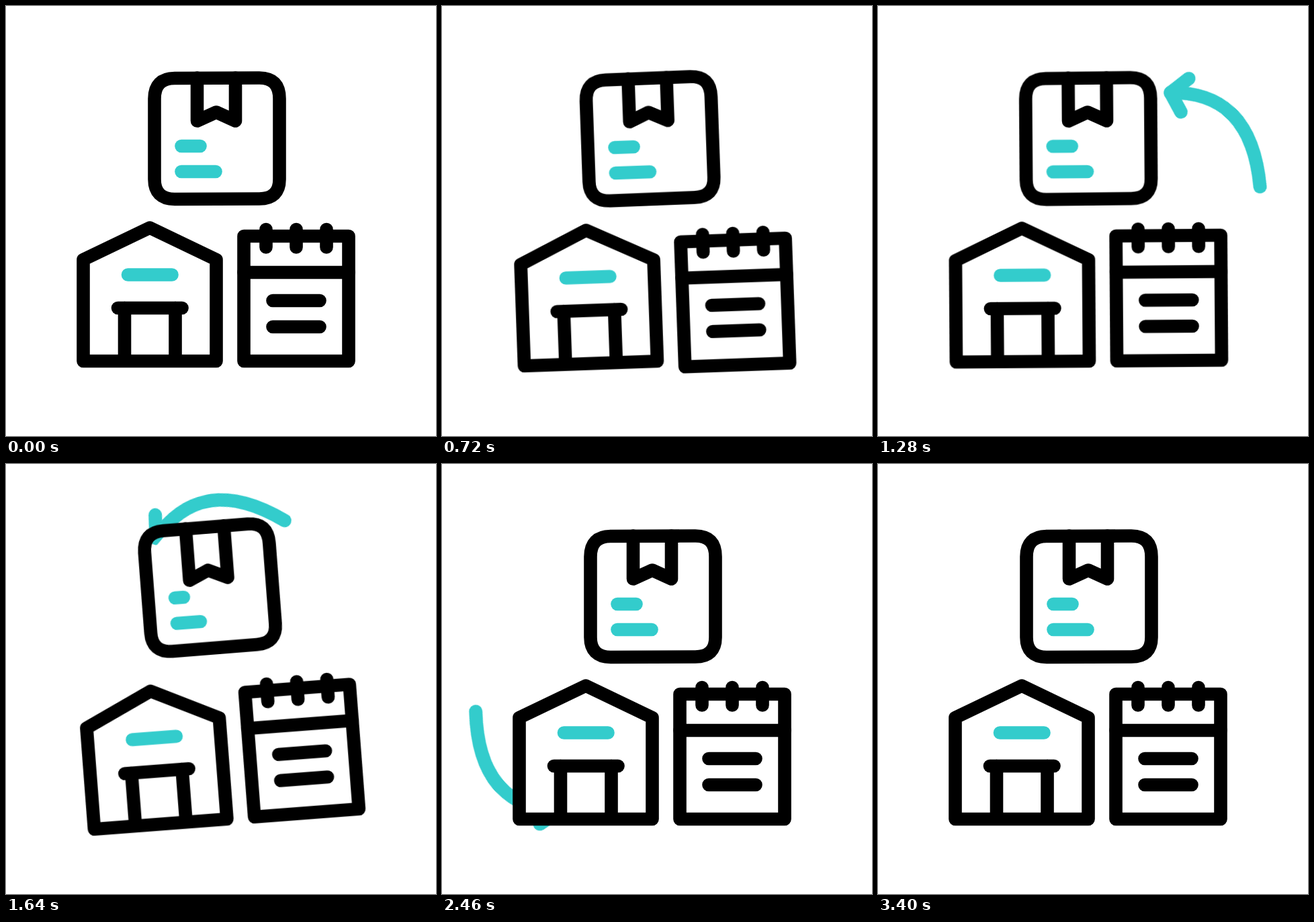
These frames come from a looping animation (640x640 px, 3.5 s). An HTML page without scripts:

```html
<!DOCTYPE html>
<html lang="en">
<head>
<meta charset="utf-8">
<title>Delivery cycle</title>
<style>
  html, body { margin: 0; width: 100%; height: 100%; overflow: hidden; background: #fff; }
  svg { display: block; width: 100%; height: 100%; }

  path, line { fill: none; stroke: #000; stroke-width: 19.6; stroke-linecap: round; stroke-linejoin: round; }
  .teal { stroke: #3cc; }
  .body { fill: #fff; }
  .mask { fill: #fff; stroke: none; }
  .arrow path { stroke-width: 20; }
  .trim { stroke-dasharray: 1 3; }

  .orbit, .wobble, .pad, .box, .ribbon, .short, .long, .wall, .lintel, .posts, .sign, .ink, .shaft, .head {
    animation: 3.5s cubic-bezier(.333, 0, .667, 1) infinite;
  }

  /* The arrow circles once behind everything */
  .orbit { transform-origin: 311px 327px; animation-name: orbit; }
  @keyframes orbit {
    0%, 1.14% { transform: rotate(329.5deg); }
    100% { transform: rotate(-30.5deg); }
  }
  .shaft { animation-name: shaft; }
  @keyframes shaft {
    0%, 20% { stroke-dashoffset: 1.2; }
    26%, 84% { stroke-dashoffset: 0; }
    94%, 100% { stroke-dashoffset: -1.2; }
  }
  .head { transform-origin: 358px 556px; animation-name: head; }
  @keyframes head {
    0%, 22.5% { transform: scale(0); }
    26%, 87% { transform: scale(1); }
    93%, 100% { transform: scale(0); }
  }

  .wobble { transform-origin: 320px 320px; animation-name: wobble; }
  @keyframes wobble {
    0%, 5.71% { transform: rotate(0deg); }
    15.86% { transform: rotate(-5deg); }
    29% { transform: rotate(5deg); }
    43.43% { transform: rotate(-5deg); }
    59%, 100% { transform: rotate(0deg); }
  }

  .pad { animation-name: pad; }
  @keyframes pad {
    0%, 8.57% { transform: translateY(0); }
    16.29% { transform: translateY(-26px); }
    23.14% { transform: translateY(26px); }
    30.29%, 100% { transform: translateY(0); }
  }
  .ink { animation-name: ink; }
  @keyframes ink {
    0%, 18.29% { stroke-dashoffset: 1.3; }
    28.43% { stroke-dashoffset: 0; }
    38.57%, 100% { stroke-dashoffset: -1.3; }
  }

  .box { animation-name: box; }
  @keyframes box {
    0%, 42.4% { transform: translateY(0); }
    50.91% { transform: translateY(-26px); }
    59.43% { transform: translateY(26px); }
    67.94%, 100% { transform: translateY(0); }
  }
  .ribbon { animation-name: ribbon; }
  @keyframes ribbon {
    0%, 42.4%, 68.17%, 100% { d: path("M284.5 107V171L313 158L341.5 171V107"); }
    51.31%, 54.29% { d: path("M284.5 107V197L313 184L341.5 197V107"); }
  }
  .short { animation-name: short; }
  @keyframes short {
    0%, 42.4%, 61.14%, 100% { d: path("M261 208.5L289 208.5"); }
    50.86% { d: path("M261 208.5L261 208.5"); }
  }
  .long { animation-name: long; }
  @keyframes long {
    0%, 42.4%, 64.43%, 100% { d: path("M261 246.5L312 246.5"); }
    54.43% { d: path("M261 246.5L261 246.5"); }
  }

  .wall { animation-name: wall; }
  @keyframes wall {
    0%, 74.29%, 96.86%, 100% { d: path("M115 528.5V377.5L214 330L313 377.5V528.5Z"); }
    82.29% { d: path("M115 528.5V351.5L214 304L313 351.5V528.5Z"); }
    89.71% { d: path("M115 528.5V390.5L214 343L313 390.5V528.5Z"); }
  }
  .lintel { animation-name: lintel; }
  @keyframes lintel {
    0%, 74.29%, 91%, 100% { d: path("M166.5 449.5L262 449.5"); }
    82.29% { d: path("M157.5 449.5L272 449.5"); }
  }
  .posts { animation-name: posts; }
  @keyframes posts {
    0%, 74.29%, 91%, 100% { d: path("M176.5 449.5V528M252 449.5V528"); }
    82.29% { d: path("M167.5 449.5V528M262 449.5V528"); }
  }
  .sign { animation-name: sign; }
  @keyframes sign {
    0%, 74.29%, 91%, 100% { d: path("M181.5 400L247 400"); }
    82.29% { d: path("M161.5 400L268 400"); }
  }
</style>
</head>
<body>
<svg viewBox="0 0 640 640">
  <g class="orbit arrow">
    <path class="teal trim shaft" pathLength="1" d="M165 547Q272.5 640.5 358 556"/>
    <path class="teal head" d="M327 546L358 556L353 590"/>
  </g>

  <g class="wobble">
    <g class="house">
      <path class="body wall" d="M115 528.5V377.5L214 330L313 377.5V528.5Z"/>
      <path class="posts" d="M176.5 449.5V528M252 449.5V528"/>
      <path class="lintel" d="M166.5 449.5L262 449.5"/>
      <path class="teal sign" d="M181.5 400L247 400"/>
    </g>

    <g class="pad">
      <path class="body" d="M354 342.5H510V528.5H354Z"/>
      <path d="M354 396.5H510M387 332.5V359M432 332.5V359M477 332.5V359"/>
      <path d="M397 438.5H467M397 477.5H467"/>
      <path class="teal trim ink" pathLength="1" d="M397 438.5H467"/>
      <path class="teal trim ink" pathLength="1" d="M467 477.5H397"/>
    </g>

    <g class="box">
      <path class="mask" d="M261 107H367L407 147V247L367 287H261L221 247V147Z"/>
      <path class="teal short" d="M261 208.5L289 208.5"/>
      <path class="teal long" d="M261 246.5L312 246.5"/>
      <path class="ribbon" d="M284.5 107V171L313 158L341.5 171V107"/>
      <path d="M251 107.5L377 107C397 107 407 117 407 138V258C407 277 397 287 377 287L251 287.5C231 287.5 221 277 221 258V138C221 118 231 107.5 251 107.5Z"/>
    </g>
  </g>
</svg>
</body>
</html>
```
